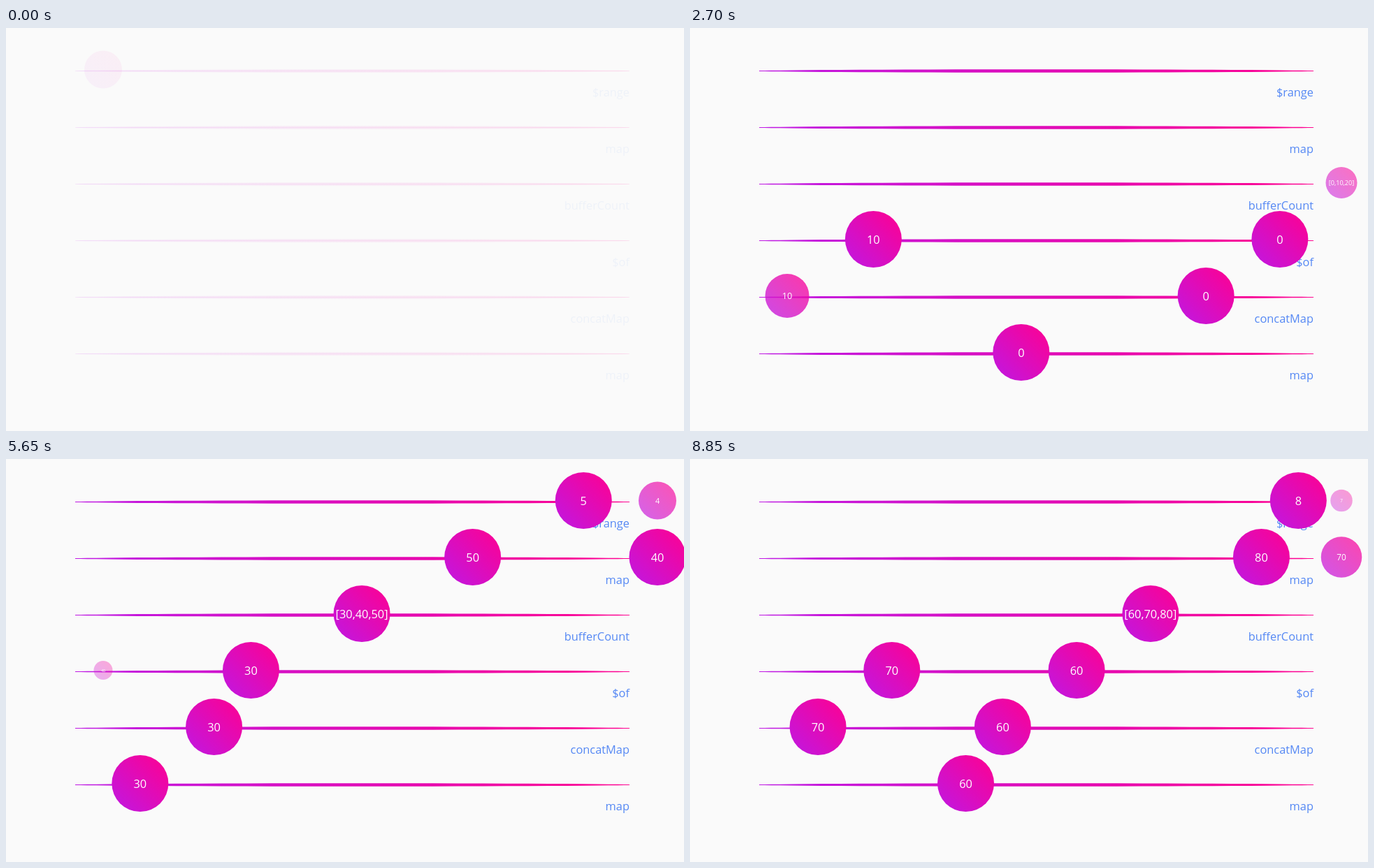
These frames come from a looping animation (970x577 px, 8930 ms). An HTML page with a canvas:

```html
<!DOCTYPE html>
<html lang="en">
<head>
<meta charset="utf-8">
<title>Stream marbles</title>
<style>
  html, body { margin: 0; width: 100%; height: 100%; overflow: hidden; background: #fafafa; }
  canvas { display: block; }
</style>
</head>
<body>
<canvas id="stage" width="970" height="577"></canvas>
<script>
const ctx = document.getElementById('stage').getContext('2d');
const LOOP = 8930, FRAMES = 116;
const TICKS_PER_FRAME = 0.7815; // a tick is 100 ms of stream time
const TRAVEL = 15, FADE = 3;    // in ticks
const LEFT = 139, SPAN = 793, RADIUS = 40.5, ROW_GAP = 81;
const FONT = '16.4px "Open Sans", "Noto Sans", sans-serif';

const single = n => String(n);
const tens = n => String(n * 10);
const triple = n => `[${[0, 1, 2].map(i => (n * 3 + i) * 10)}]`;
const rows = [['$range', single], ['map', tens], ['bufferCount', triple],
  ['$of', tens], ['concatMap', tens], ['map', tens]]
  .map(([label, text]) => ({ label, text, starts: [] }));

// Tempo of the pipeline: emission number against tick.
const EMISSIONS = 44, ROUND = 16;
const tempo = [[0, 1.3], [6, 11], [8, 16], [10, 25], [12, 31.3], [17, 39.5],
  [20, 43.5], [23, 52.5], [25, 56], [27, 62.3], [32, 70.6], [35, 74],
  [37, 77.4], [38, 79.7], [43, 89.2]];

const clamp = v => Math.min(1, Math.max(0, v));
const mix = (a, b, p) => a + (b - a) * p;

function emissionTick(n) {
  const i = Math.max(1, tempo.findIndex(([end]) => n <= end));
  const [n0, a] = tempo[i - 1], [n1, b] = tempo[i];
  return Math.round(mix(a, b, (n - n0) / (n1 - n0)));
}

// Each round: three range/map pairs, one buffer, then three of/concatMap/map runs.
function emissionRow(n) {
  const k = n % ROUND;
  if (k < 6) return k % 2;
  return k === 6 ? 2 : 3 + (k - 7) % 3;
}

for (let n = 0; n < EMISSIONS; n++) rows[emissionRow(n)].starts.push(emissionTick(n));

function gradient(x0, y0, x1, y1) {
  const g = ctx.createLinearGradient(x0, y0, x1, y1);
  g.addColorStop(0, '#be18e4');
  g.addColorStop(1, '#ff008f');
  return g;
}

const lineFill = gradient(99, 0, 892, 0);
const ballFill = gradient(-RADIUS, RADIUS, RADIUS, -RADIUS);

function drawTrack({ label }, i) {
  const y = 61.5 + i * ROW_GAP;
  ctx.fillStyle = lineFill;
  ctx.beginPath();
  ctx.ellipse(495.5, y, 396.5, 2.25, 0, 0, Math.PI * 2);
  ctx.fill();
  ctx.fillRect(99, y - 0.5, 793, 1);
  ctx.fillStyle = '#5588f4';
  ctx.textAlign = 'right';
  ctx.fillText(label, 892, y + 36.5);
}

function drawBall(text, age, y, alpha) {
  const scale = Math.min(1, 1 + age / FADE, 1 - (age - TRAVEL) / FADE);
  if (scale <= 0) return;
  ctx.save();
  ctx.translate(LEFT + SPAN * clamp(age / TRAVEL), y);
  ctx.scale(scale, scale);
  ctx.globalAlpha = alpha * scale;
  ctx.fillStyle = ballFill;
  ctx.beginPath();
  ctx.arc(0, 0, RADIUS, 0, Math.PI * 2);
  ctx.fill();
  ctx.globalAlpha = alpha;
  ctx.fillStyle = '#fff';
  ctx.textAlign = 'center';
  ctx.fillText(text, 0, 6);
  ctx.restore();
}

// The pointer rests briefly, then leaves upwards.
function drawCursor(tick) {
  if (tick < 15 || tick > 18) return;
  const p = clamp((tick - 16) / 2);
  ctx.save();
  ctx.translate(mix(256, 296, p), mix(178, 8, p));
  ctx.fillStyle = '#1f9a2a';
  ctx.fill(new Path2D('M0 0L8 8L5 8.5L8 14L6 15L3.4 9.6L1 12Z'));
  ctx.restore();
}

function draw(now) {
  const frame = Math.floor((now % LOOP + 5) * FRAMES / LOOP);
  const tick = Math.round(frame * TICKS_PER_FRAME * 6) / 6;
  const alpha = clamp(0.07 + frame * 0.35);
  ctx.globalAlpha = 1;
  ctx.fillStyle = '#fafafa';
  ctx.fillRect(0, 0, 970, 577);
  ctx.font = FONT;
  ctx.globalAlpha = alpha;
  rows.forEach(drawTrack);
  rows.forEach(({ text, starts }, i) => starts.forEach((start, n) =>
    drawBall(text(n), tick - start, 59.5 + i * ROW_GAP, alpha)));
  drawCursor(tick);
}

let origin;
function loop(now) {
  origin ??= now;
  draw(Math.max(0, now - origin));
  requestAnimationFrame(loop);
}
draw(0);
requestAnimationFrame(loop);
</script>
</body>
</html>
```
